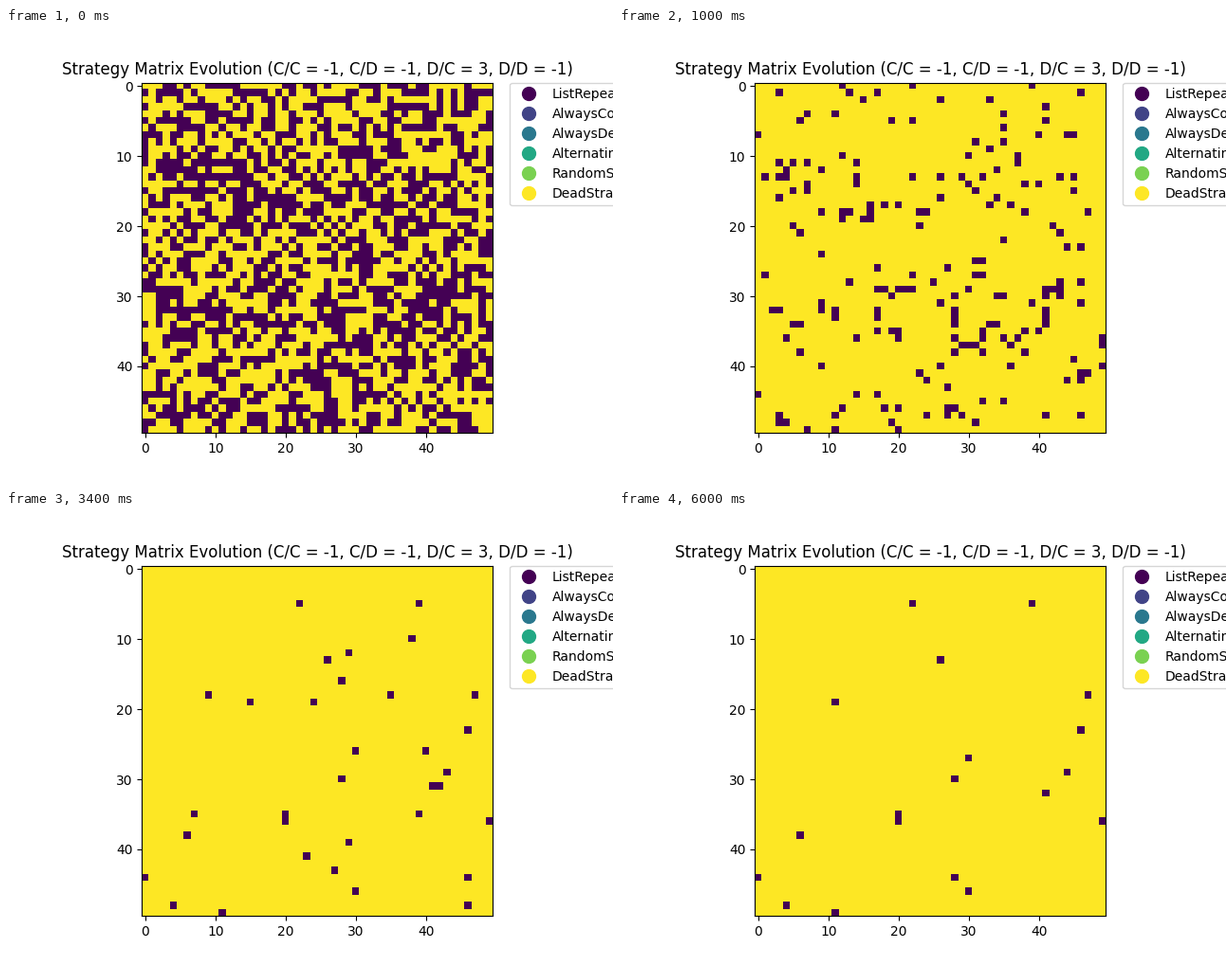
A matplotlib script for the animation above (6200 ms loop, 640 by 480 pixels).

```python
import numpy as np
import matplotlib.pyplot as plt
from matplotlib.animation import FuncAnimation

SIZE, STEPS, STEP_MS = 50, 31, 200
ALIVE, DEAD = 0, 5
NAMES = ["ListRepeater", "AlwaysCooperate", "AlwaysDefect",
         "Alternating", "RandomStrategy", "DeadStrategy"]

# cells that hold out to the end, as (column, row)
HOLDOUTS = [(22, 5), (26, 13), (47, 18), (46, 23), (28, 30), (20, 35),
            (20, 36), (49, 36), (6, 38), (0, 44), (4, 48), (11, 49)]


def wanderers_left(t):
    """Fast exponential die-off with a small, slowly shrinking remainder."""
    return int(1130 * np.exp(-0.42 * t) + 75 * np.exp(-0.075 * t))


def seed_cells(rng):
    """Random living cells, the longest-lived (most crowded) first."""
    alive = rng.random((SIZE, SIZE)) < 0.48
    crowd = sum(np.roll(alive, (dy, dx), (0, 1)).astype(int)
                for dy in (-1, 0, 1) for dx in (-1, 0, 1))
    y, x = np.nonzero(alive)
    life = 0.1 * crowd[y, x] + rng.random(len(x))
    return np.column_stack((x, y))[np.argsort(-life)]


def evolve():
    rng = np.random.default_rng(7)
    cells = seed_cells(rng)
    history = []
    for t in range(STEPS):
        living = cells[:wanderers_left(t)] if t else cells
        x, y = np.vstack((HOLDOUTS, living)).T
        grid = np.full((SIZE, SIZE), DEAD)
        grid[y, x] = ALIVE
        history.append(grid)
        # a fifth of the cells drift to a neighbouring place
        moving = rng.random((len(cells), 1)) < 0.2
        drift = rng.integers(-1, 2, cells.shape)
        cells = np.clip(cells + moving * drift, 0, SIZE - 1)
    return history


history = evolve()
fig, ax = plt.subplots(figsize=(6.4, 4.8), dpi=100)
image = ax.imshow(history[0], cmap="viridis", vmin=ALIVE, vmax=DEAD)
ax.set_title("Strategy Matrix Evolution "
             "(C/C = -1, C/D = -1, D/C = 3, D/D = -1)")
handles = [plt.Line2D([], [], marker="o", ls="", ms=10, label=name,
                      color=plt.cm.viridis(i / DEAD))
           for i, name in enumerate(NAMES)]
ax.legend(handles=handles, bbox_to_anchor=(1.05, 1), loc="upper left",
          borderaxespad=0)


def update(t):
    image.set_data(history[t])
    return [image]


anim = FuncAnimation(fig, update, frames=STEPS, interval=STEP_MS,
                     init_func=lambda: update(0), repeat=True)
plt.show()
```
